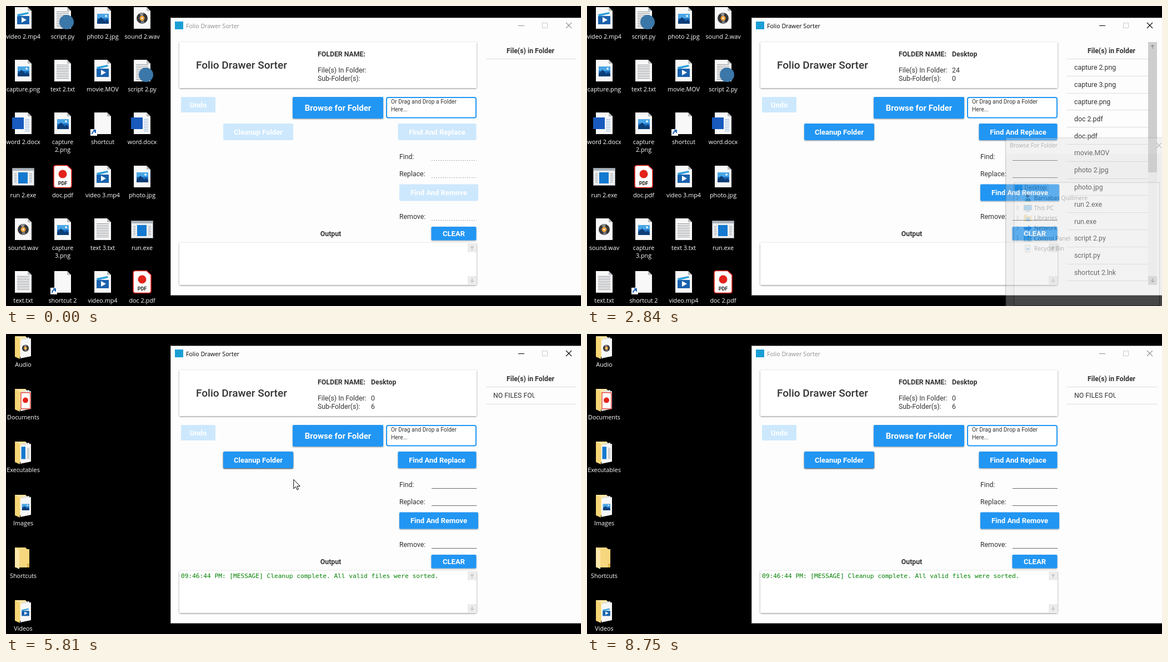
Write an HTML page that moves like this. It is 1035 by 541 pixels and loops after 8800 ms.

```html
<!DOCTYPE html>
<html lang="en">
<head>
<meta charset="utf-8">
<title>Folder cleanup demo</title>
<style>
html, body { margin: 0; width: 100%; height: 100%; overflow: hidden; background: #000; }
svg { display: block; width: 100%; height: 100%; }
.ui { font-family: "Open Sans", "Noto Sans", sans-serif; }
.app { font-family: Roboto, Arial, sans-serif; }
.mono { font-family: "DejaVu Sans Mono", "Liberation Mono", monospace; }
</style>
</head>
<body>
<svg id="stage" viewBox="0 0 1035 541" xmlns="http://www.w3.org/2000/svg"></svg>
<script>
const LOOP = 8800, COL = 71.6, ROW = 95.2, BLUE = "#2196f3", PALE = "#cde8fd";
const stage = document.getElementById("stage");

// Markup helpers
const rect = (x, y, w, h, fill, more = "") =>
  `<rect x="${x}" y="${y}" width="${w}" height="${h}" fill="${fill}" ${more}/>`;
const circle = (x, y, r, fill, more = "") => `<circle cx="${x}" cy="${y}" r="${r}" fill="${fill}" ${more}/>`;
const path = (d, fill, more = "") => `<path d="${d}" fill="${fill}" ${more}/>`;
const line = (d, color, width = 1, more = "") =>
  `<path d="${d}" fill="none" stroke="${color}" stroke-width="${width}" ${more}/>`;
const text = (x, y, str, size, fill, cls = "app", more = "") =>
  `<text x="${x}" y="${y}" font-size="${size}" fill="${fill}" class="${cls}" ${more}>${str}</text>`;
const group = (id, body, more = "") => `<g id="${id}" ${more}>${body}</g>`;
const bold = 'font-weight="700"', mid = 'text-anchor="middle"';

// Desktop icons, drawn around x = 0 with the cell top at y = 0
const page = path("M-15 2H8L15 9V41H-15Z", "#f8f8f8") + path("M8 2V9H15Z", "#b9bcc0");
const ruled = (x0, x1, y0, y1, color = "#8d9196") => {
  let d = "";
  for (let y = y0; y <= y1; y += 3) d += `M${x0} ${y + .5}H${x1}`;
  return line(d, color);
};
const film = rect(-11, 18, 22, 15, "#1a62ad") + path("M-11 15L9 11L10 14L-10 19Z", "#2fa0dd") +
  path("M-3 20V30L6 25Z", "#fff");
const scene = rect(-10, 14, 21, 18, "#1d6fc0") + rect(-10, 14, 21, 8, "#4aa6e6") +
  path("M-10 32V27L-3 20L4 27L7 24L11 28V32Z", "#0d3e78") + circle(6, 18, 1.8, "#fff");
const disc = circle(0, 22, 10, "#35373a") + path("M0 22L-5 13.500A10 10 0 0 1 3 12.500Z", "#8b8d90") +
  path("M0 22L5 30.500A10 10 0 0 1 -3 31.500Z", "#77797c") + circle(0, 22, 4.5, "#f0a13a") + circle(0, 22, 1.5, "#fff");
const icons = {
  v: page + film,
  i: page + scene,
  s: page + disc,
  t: page + ruled(-11, 11, 11, 37),
  p: page + ruled(-11, 11, 10, 38) + circle(7, 29, 13, "#3b77a8"),
  w: page + ruled(3, 11, 14, 35, "#8fb2e0") + rect(-20, 11, 21, 21, "#185abd"),
  l: page + rect(-22, 32, 12, 12, "#fff") + line("M-19 41Q-19 36 -14 36M-17 34H-13V39", "#1c63b7", 2),
  e: rect(-19.5, 6.5, 39, 31, "#eceef0", 'stroke="#8b9299"') + rect(-19, 7, 38, 4, "#aab2ba") +
    rect(-9, 14, 17, 20, "#1479d0") + ruled(-16, -12, 16, 32, "#9aa1a8") + ruled(11, 16, 16, 32, "#9aa1a8"),
  d: path("M-12 1.500H8L16 9V38Q16 41.500 12 41.500H-12Q-16 41.500 -16 38V5Q-16 1.500 -12 1.500Z", "#fff", 'stroke="#e3231b" stroke-width="1.600"') +
    circle(0, 17, 7.5, "#e3231b") + text(0, 37, "PDF", 9, "#222", "app", mid + " " + bold)
};
const files = `v video 2.mp4,p script.py,i photo 2.jpg,s sound 2.wav
i capture.png,t text 2.txt,v movie.MOV,p script 2.py
w word 2.docx,i capture|2.png,l shortcut,w word.docx
e run 2.exe,d doc.pdf,v video 3.mp4,i photo.jpg
s sound.wav,i capture|3.png,t text 3.txt,e run.exe
t text.txt,l shortcut 2,v video.mp4,d doc 2.pdf`.split("\n").map(r => r.split(","));

const cell = (c, r, icon, label) =>
  `<g transform="translate(${Math.floor(31 + c * COL)} ${Math.round(r * ROW)})">${icon}` +
  label.split("|").map((s, i) => text(0, 59 + i * 14, s, 10.8, "#fff", "ui", mid)).join("") + "</g>";

const flap = path("M-15 4L-6 9V45L-15 41Z", "#f6d576");
const sheet = inner => path("M-15 4H4L7 7H11V41H-15Z", "#fbe6a4") + path("M-2 8L11 6V38L-2 41Z", "#dfe3e6") +
  path("M-5 11L14 8V40L-5 44Z", "#f7f7f7") + `<g transform="translate(4 12) scale(.62)">${inner}</g>` + flap;
const folders = [
  ["Audio", sheet(disc)],
  ["Documents", sheet(rect(-13, -2, 27, 47, "#fff", 'stroke="#e3231b" stroke-width="2"') + circle(0, 20, 8, "#e3231b"))],
  ["Executables", sheet(rect(-12, 2, 12, 36, "#1479d0") + ruled(4, 12, 6, 38))],
  ["Images", sheet(scene)],
  ["Shortcuts", path("M-15 4H4L7 7H11V40H-15Z", "#f7d77e") + path("M-15 4L-7 9V43L-15 39Z", "#fde9ab") + rect(7, 33, 4, 7, "#e0b64e")],
  ["Videos", sheet(film)]
];

const desktop =
  group("files", files.map((row, r) => row.map((f, c) => cell(c, r, icons[f[0]], f.slice(2))).join("")).join("")) +
  group("folders", rect(.5, 0, 65.5, 64, "#1b242b", 'id="hover" stroke="#4c5963"') +
    folders.map(([name, icon], r) => cell(0, r, icon, name)).join(""));

// Application window
const button = (id, x, y, w, h, label, size = 13) => group(id,
  rect(x, y, w, h, BLUE, 'rx="2"') +
  text(x + w / 2, y + h / 2 + size * .36, label, size, "#fff", "app", mid + " " + bold));
const card = (y, h) => rect(312, y, 535, h, "#fff", 'rx="2" filter="url(#card)"');
const label = (x, y, s, more = "", id = "") => text(x, y, s, 12.3, "#333", "app", `${more} ${id && `id="${id}"`}`);
const arrow = (x, y, up, color) => line(up
  ? `M${x} ${y + 4}V${y - 3}M${x - 3} ${y}L${x} ${y - 3}L${x + 3} ${y}`
  : `M${x} ${y - 4}V${y + 3}M${x - 3} ${y}L${x} ${y + 3}L${x + 3} ${y}`, color);
const fieldLines = "M766 278.500H847M766 309.500H847M766 386.500H847";
const names = "capture 2.png,capture 3.png,capture.png,doc 2.pdf,doc.pdf,movie.MOV,photo 2.jpg,photo.jpg,run 2.exe,run.exe,script 2.py,script.py,shortcut 2.lnk".split(",");
const rule = (i, end) => line(`M864 ${Math.round(96 + i * 30.8) - .5}H${end}`, "#dcdcdc");

const appWindow = rect(296.5, 21.5, 740, 500, "#fdfdfd", 'stroke="#b4b4b4"') +
  rect(304, 28, 15, 14, "#1a9fd4") +
  group("caption", text(324, 39.5, "Folio Drawer Sorter", 10.6, "currentColor", "ui") +
    line("M922 35.500H933M1008 30L1018 40M1018 30L1008 40", "currentColor", 1.1)) +
  rect(965.5, 30.5, 9, 9, "none", 'stroke="#ccc"') +
  card(65, 83) +
  text(342, 113, "Folio Drawer Sorter", 19, "#333", "app", 'font-weight="500"') +
  label(561, 91, "FOLDER NAME:", bold) + label(657, 91, "Desktop", bold, "folderName") +
  label(561, 120, "File(s) In Folder:") + label(657, 120, "", "", "fileCount") +
  label(561, 135, "Sub-Folder(s):") + label(657, 135, "", "", "subCount") +
  button("undo", 315, 164, 62, 28, "Undo") +
  button("browse", 516, 164, 163, 39, "Browse for Folder", 15) +
  rect(685, 165, 161, 36.5, "#fff", `rx="3" stroke="${BLUE}" stroke-width="2"`) +
  text(693, 176, "Or Drag and Drop a Folder", 10.3, "#333") + text(693, 189.5, "Here...", 10.3, "#333") +
  button("cleanup", 391, 212, 126, 30, "Cleanup Folder") +
  button("replace", 705.5, 212, 141, 30, "Find And Replace") +
  button("remove", 708, 321.5, 142, 30, "Find And Remove") +
  label(708, 275.5, "Find:") + label(708, 306.5, "Replace:") + label(708, 383.5, "Remove:") +
  group("dotted", line(fieldLines, "#a8a8a8", 1, 'stroke-dasharray="2 2"')) +
  group("solid", line(fieldLines, "#6a6a6a")) +
  label(584.5, 415, "Output", mid + " " + bold) +
  button("clear", 765.5, 398, 81, 24.5, "CLEAR") +
  card(427, 76) +
  rect(831, 428, 16, 16, "#ececec") + rect(831, 487, 16, 15, "#ececec") +
  arrow(839, 436, true, "#aaa") + arrow(839, 495, false, "#aaa") +
  text(315, 439.5, "09:46:44 PM: [MESSAGE] Cleanup complete. All valid files were sorted.", 11.16, "#008000", "mono", 'id="log"') +
  label(944, 85, "File(s) in Folder", mid + " " + bold) +
  group("wideRule", rule(0, 1026)) +
  group("list", names.map((n, i) => label(877, 115.3 + i * 30.8, n) + rule(i, 1010)).join("") + rule(13, 1010) +
    rect(1010, 65, 16, 438, "#f3f3f3") + rect(1010, 65, 16, 235, "#cecece") + rect(1010, 487, 16, 16, "#d6d6d6") +
    arrow(1018, 73, true, "#777") + arrow(1018, 495, false, "#777")) +
  group("empty", `<g clip-path="url(#cut)">${label(877, 115.3, "NO FILES FOUND")}</g>` + rule(1, 1026));

// Folder picker
const monitor = rect(-7, -5, 14, 9, "#2d9be0", 'stroke="#3c6d92"') + line("M-4 6.500H4", "#6b8596", 1.5);
const tree = [
  ["Desktop", rect(-7, -5, 14, 10, "#1b8ad6") + rect(-7, 3, 14, 2, "#0f5f9c")],
  ["Barnabas Quillmere", circle(0, -3.5, 3.5, "#7d5a41") + path("M-5 7Q-5 1 0 1Q6 1 6 7Z", "#5b8a72")],
  ["This PC", monitor],
  ["Libraries", path("M-7 -6H-2L-1 -4H7V6H-7Z", "#f4c64f") + rect(-3, -1, 7, 7, "#3d9be0")],
  ["Network", path("M-7 -2H1V-6L8 0L1 6V3H-7Z", "#2878bd")],
  ["Control Panel", rect(-7, -5, 14, 11, "#2d8fd0") + ruled(-5, 0, -2, 4, "#fff") + circle(4, 1, 2, "#f2c14b")],
  ["Recycle Bin", path("M-5 -6H5L4 7H-4Z", "#eef2f5", 'stroke="#8b99a4"') + circle(0, 1, 2.5, "#3a8dd0")]
];
const picker = rect(749.5, 233.5, 300, 356, "#f0f0f0", 'stroke="#777" filter="url(#card)"') +
  rect(750, 234, 299, 29, "#fff") +
  text(757, 251.5, "Browse For Folder", 10.5, "#111", "ui") +
  line("M1029.500 243L1038 252M1038 243L1029.500 252", "#222", 1.1) +
  rect(764.5, 316.5, 270, 229, "#fff", 'stroke="#828790"') +
  rect(765, 317, 64, 18, "#cfe8f8") +
  tree.map(([name, icon], i) => {
    const y = 326 + i * 18.85, x = i ? 790 : 773;
    return `<g transform="translate(${x} ${y})">${icon}</g>` + text(i ? 802 : 784, y + 4, name, 10.7, "#111", "ui") +
      (i && i < 6 ? line(`M769 ${y - 4}l4 4l-4 4`, "#8a8a8a", 1.1) : "");
  }).join("");

const pointer = group("arrowCursor", path("M0 0V16.500L3.800 13L6.300 18.600L8.700 17.500L6.300 12H11.500Z", "#fff", 'stroke="#000" stroke-linejoin="round"')) +
  group("handCursor", path("M-1.800 1.500Q0 -1.500 1.800 1.500V7Q4 5.500 5 8Q7 6.500 8 9Q11 8 11 11V16L9 21H0L-5 14Q-6.500 11 -4 11L-1.800 13Z", "#fff", 'stroke="#000" stroke-width="1.200"') +
    line("M1.800 7V11M5 8V11.500M8 9V12", "#000"));

const shadow = (id, dy, blur, alpha) => `<filter id="${id}" x="-10%" y="-20%" width="120%" height="150%">` +
  `<feDropShadow dx="0" dy="${dy}" stdDeviation="${blur}" flood-opacity="${alpha}"/></filter>`;
stage.innerHTML = `<defs>${shadow("card", 1, 1.8, .45)}${shadow("low", 1, 1.3, .4)}${shadow("high", 1, 1.3, .8)}
  <clipPath id="cut"><rect x="870" y="100" width="81.500" height="20"/></clipPath></defs>` +
  rect(0, 0, 1035, 541, "#000") + desktop + appWindow +
  group("dim", rect(753, 238, 282, 303, "#000", 'opacity=".06"')) +
  group("picker", picker) + group("cursor", pointer);

const el = {};
stage.querySelectorAll("[id]").forEach(e => el[e.id] = e);
const show = (id, on) => el[id].setAttribute("display", on ? "inline" : "none");
const clamp = v => Math.max(0, Math.min(1, v));
const within = (t, a, b) => t >= a && t < b;

// Pointer route: time, x, y
const route = [
  [160, 1030, 506], [500, 862, 380], [800, 655, 215], [1000, 618, 178], [1400, 618, 178], [1900, 880, 546],
  [3000, 880, 546], [3550, 565, 305], [3940, 474, 229], [4820, 474, 229], [5250, 519, 263],
  [5810, 519, 263], [6180, 60, 40], [6300, 20, 42], [6400, 14, 105], [6520, 14, 188], [6660, 17, 270],
  [6710, 17, 276], [7000, 22, 515], [7260, 22, 515], [7460, 263, 442], [7960, 263, 442], [8060, 828, 480],
  [8110, 828, 480]
];
function pointerAt(t) {
  const i = route.findIndex(k => k[0] > t);
  if (i < 1) return null;
  const [t0, x0, y0] = route[i - 1], [t1, x1, y1] = route[i], p = (t - t0) / (t1 - t0);
  return [x0 + (x1 - x0) * p, y0 + (y1 - y0) * p];
}

function paint(id, enabled, lit, raised) {
  const box = el[id].firstChild;
  box.setAttribute("fill", !enabled ? PALE : lit ? "#5bb2f7" : BLUE);
  if (enabled) box.setAttribute("filter", `url(#${raised ? "high" : "low"})`);
  else box.removeAttribute("filter");
}

function render(t) {
  const loaded = t >= 2700, sorted = t >= 4300, tidy = t >= 4900;
  show("files", !tidy);
  show("folders", tidy);
  el.caption.setAttribute("color", within(t, 960, 1110) || within(t, 2700, 8750) ? "#000" : "#8f8f8f");
  show("folderName", loaded);
  el.fileCount.textContent = sorted ? "0" : loaded ? "24" : "";
  el.subCount.textContent = sorted ? "6" : loaded ? "0" : "";
  show("list", loaded && !sorted);
  show("wideRule", !loaded || sorted);
  show("empty", sorted);
  show("log", sorted);
  show("dotted", !loaded);
  show("solid", loaded);

  paint("undo", false);
  paint("browse", true, within(t, 850, 1460), within(t, 960, 2700) || within(t, 2950, 4200));
  paint("cleanup", loaded, within(t, 4200, 4520), t >= 3900);
  paint("replace", loaded);
  paint("remove", loaded);
  paint("clear", true);

  const open = clamp((t - 1110) / 240), close = clamp((t - 2700) / 195);
  const scale = 1 - .07 * (1 - open) ** 3 - .042 * close;
  show("picker", open > 0 && close < 1);
  show("dim", close > 0 && close < 1);
  el.picker.setAttribute("opacity", open * (1 - close));
  el.picker.setAttribute("transform", `translate(895 375) scale(${scale}) translate(-895 -375)`);

  const at = pointerAt(t);
  show("cursor", at);
  show("hover", false);
  if (!at) return;
  const [x, y] = at;
  const hand = within(t, 3880, 4840) || within(t, 860, 1110);
  show("handCursor", hand);
  show("arrowCursor", !hand);
  el.cursor.setAttribute("transform", `translate(${x} ${y})`);
  const row = Math.floor((y + 2) / ROW);
  if (tidy && x < 66 && y + 2 - row * ROW < 66) {
    show("hover", true);
    el.hover.setAttribute("y", Math.round(row * ROW - 2) + .5);
  }
}

const start = performance.now();
function tick() {
  render((performance.now() - start) % LOOP);
  requestAnimationFrame(tick);
}
tick();
</script>
</body>
</html>
```
